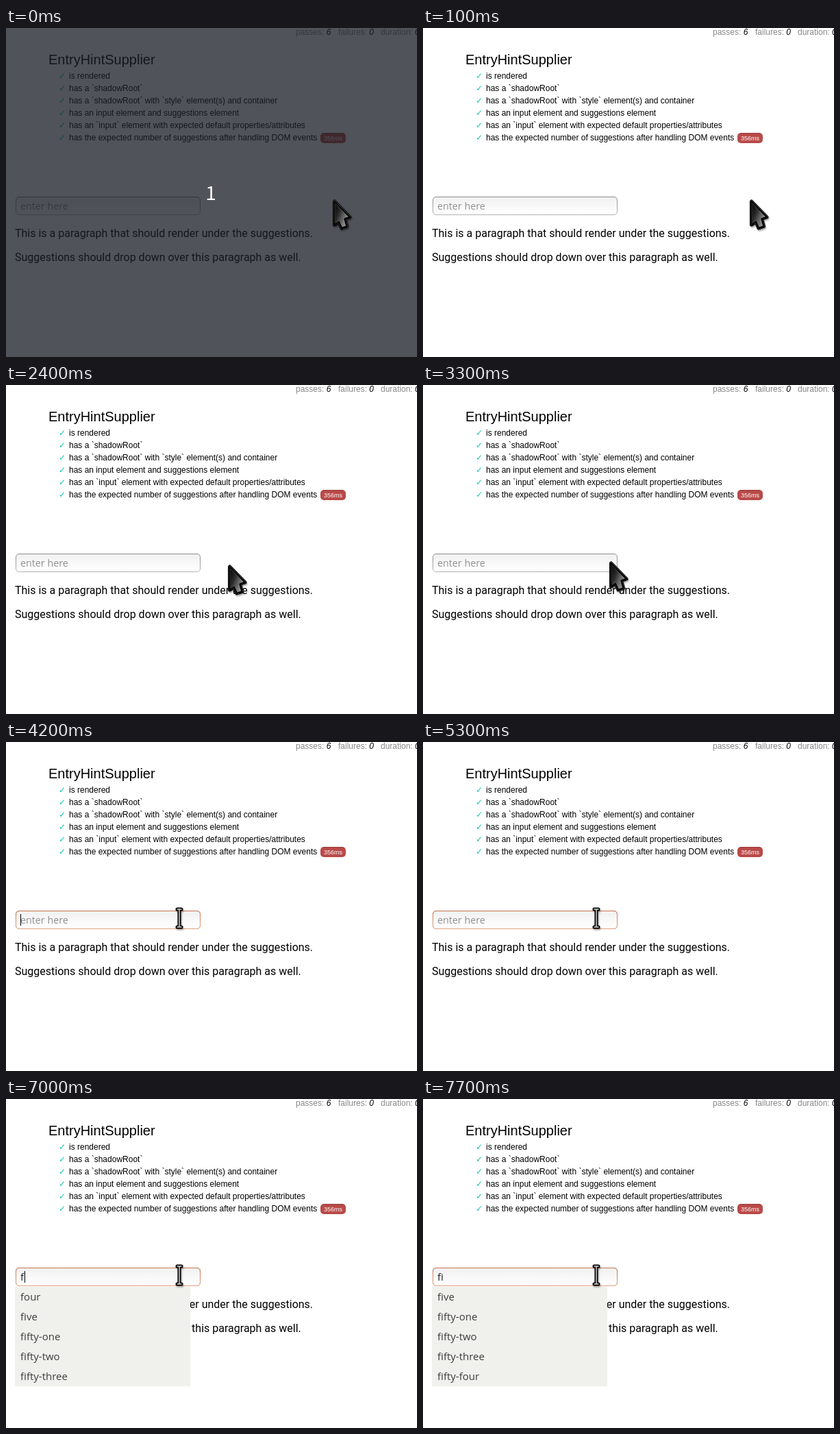
An HTML page for the animation above (8000 ms loop, 600 px wide and 480 px high).

```html
<!DOCTYPE html>
<html lang="en">
<head>
<meta charset="utf-8">
<style>
  html, body { margin: 0; width: 100%; height: 100%; overflow: hidden; background: #fff; }
  svg { display: block; width: 600px; height: 480px; }
  text { white-space: pre; }
  .report { font: 12px "Liberation Sans", Arial, sans-serif; }
  .stat { fill: #888; }
  .stat tspan { fill: #000; font-style: italic; }
  .tick { font: 12px "DejaVu Sans", sans-serif; fill: #10c8b2; }
  .page { font: 16px Roboto, sans-serif; }
  .field { font: 15px "Open Sans", sans-serif; fill: #3c3c3c; }
  #hint { font-size: 14.3px; fill: #909090; }
  #intro { font: 28px "Noto Sans CJK JP", "Noto Sans CJK", "DejaVu Sans", sans-serif; }
  .pointer { filter: drop-shadow(1px 2px 1px rgba(0, 0, 0, .35)); }
</style>
</head>
<body>
<svg viewBox="0 0 600 480">
  <defs>
    <linearGradient id="fieldFill" x2="0" y2="1">
      <stop stop-color="#f0f0f0"/><stop offset=".6" stop-color="#fafafa"/><stop offset="1" stop-color="#fff"/>
    </linearGradient>
    <linearGradient id="idle" x2="0" y2="1">
      <stop stop-color="#8e8e8e"/><stop offset="1" stop-color="#b4b4b4"/>
    </linearGradient>
    <linearGradient id="focus" x2="0" y2="1">
      <stop stop-color="#cb744e"/><stop offset="1" stop-color="#dfa27e"/>
    </linearGradient>
    <linearGradient id="steel" x2="1" y2=".7">
      <stop stop-color="#000"/><stop offset=".4" stop-color="#2a2a2a"/><stop offset="1" stop-color="#b0b0b0"/>
    </linearGradient>
    <path id="arrowShape" d="M1.5 2V36L8 32L12 41L19.5 38.5L16.5 27.5L24 25Z"/>
    <path id="beamShape" d="M-3-13H3M0-13V13M-3 13H3"/>
  </defs>

  <g class="report">
    <text class="stat" x="423" y="10">passes: <tspan>6</tspan></text>
    <text class="stat" x="485" y="10">failures: <tspan>0</tspan></text>
    <text class="stat" x="547" y="10">duration: <tspan>0.41</tspan></text>
    <text x="62" y="53" font-size="20">EntryHintSupplier</text>
    <g id="tests"></g>
    <rect x="459" y="153" width="37" height="15" rx="5" fill="#b94a48"/>
    <path d="M463 153.5H492" stroke="#943b3a"/>
    <text x="464" y="164" font-size="9" fill="#fff">356ms</text>
  </g>

  <g class="page">
    <text x="13" y="305">This is a paragraph that should render under the suggestions.</text>
    <text x="13" y="340">Suggestions should drop down over this paragraph as well.</text>
  </g>

  <g class="field">
    <rect x="14.5" y="246.5" width="269" height="26" rx="4.5" fill="url(#fieldFill)" stroke="url(#idle)"/>
    <rect id="ring" x="14.5" y="246.5" width="269" height="26" rx="4.5" fill="none" stroke="url(#focus)"/>
    <text id="hint" x="21" y="265">enter here</text>
    <text id="typed" x="21" y="265" fill="#222"></text>
    <rect id="caret" y="251" width="1" height="17" fill="#000"/>
    <g id="menu">
      <rect x="13" y="274" width="256" height="145" fill="#f0f0ec"/>
      <g id="items"></g>
    </g>
  </g>

  <g id="intro">
    <rect width="600" height="480" fill="#1a1e25" fill-opacity=".76"/>
    <text x="299" y="251" text-anchor="middle" fill="#fff">1</text>
  </g>

  <g id="arrow" class="pointer" stroke-linejoin="round">
    <use href="#arrowShape" fill="url(#steel)" stroke="#000" stroke-width="5"/>
    <use href="#arrowShape" fill="url(#steel)" stroke="#aaa" stroke-width="2.6"/>
    <use href="#arrowShape" fill="none" stroke="#000" stroke-width="2.4"/>
  </g>
  <g id="beam" class="pointer" fill="none" stroke-linecap="round">
    <use href="#beamShape" stroke="#000" stroke-width="5"/>
    <use href="#beamShape" stroke="#d4d4d4" stroke-width="1.5"/>
  </g>
</svg>

<script>
const LOOP = 8000;
const $ = id => document.getElementById(id);
const show = (id, on) => $(id).setAttribute("visibility", on ? "visible" : "hidden");

const tests = [
  "is rendered",
  "has a `shadowRoot`",
  "has a `shadowRoot` with `style` element(s) and container",
  "has an input element and suggestions element",
  "has an `input` element with expected default properties/attributes",
  "has the expected number of suggestions after handling DOM events"
];
$("tests").innerHTML = tests.map((label, i) =>
  `<text class="tick" x="77" y="${74 + i * 18}">✓</text><text x="92" y="${74 + i * 18}">${label}</text>`
).join("");

const words = ["four", "five", "fifty-one", "fifty-two", "fifty-three", "fifty-four"];
const renderItems = list => list.map((word, i) =>
  `<text x="21" y="${294 + i * 29}">${word}</text>`).join("");
const menus = [renderItems(words.slice(0, 5)), renderItems(words.slice(1))];

// [start ms, x, y]; the pointer is sampled in 100 ms steps
const pointer = [
  [0, 478, 251], [2100, 378, 259], [2200, 350, 262], [2300, 333, 263], [2400, 325, 263],
  [3100, 316, 262], [3200, 296, 260], [3300, 273, 258],
  [3400, 268, 259], [3600, 260, 258], [3700, 253, 257]
];

let shownMenu;
function draw(t) {
  const [, x, y] = pointer.findLast(key => t >= key[0]);
  const overField = t >= 3400;
  show("arrow", !overField);
  show("beam", overField);
  $(overField ? "beam" : "arrow").setAttribute("transform", `translate(${x} ${y})`);

  show("intro", t < 100);
  $("ring").setAttribute("opacity", t < 4100 ? 0 : t < 4200 ? .5 : 1);

  const typed = t < 6800 ? "" : t < 7600 ? "f" : "fi";
  $("typed").textContent = typed;
  show("hint", !typed);
  show("caret", (t >= 4100 && t < 5300) || (t >= 6500 && t < 7600));
  $("caret").setAttribute("x", typed ? 27 : 21);

  show("menu", t >= 7000);
  const menu = menus[t < 7700 ? 0 : 1];
  if (menu !== shownMenu) $("items").innerHTML = shownMenu = menu;
}

function tick() {
  draw(performance.now() % LOOP);
  requestAnimationFrame(tick);
}
tick();
</script>
</body>
</html>
```
